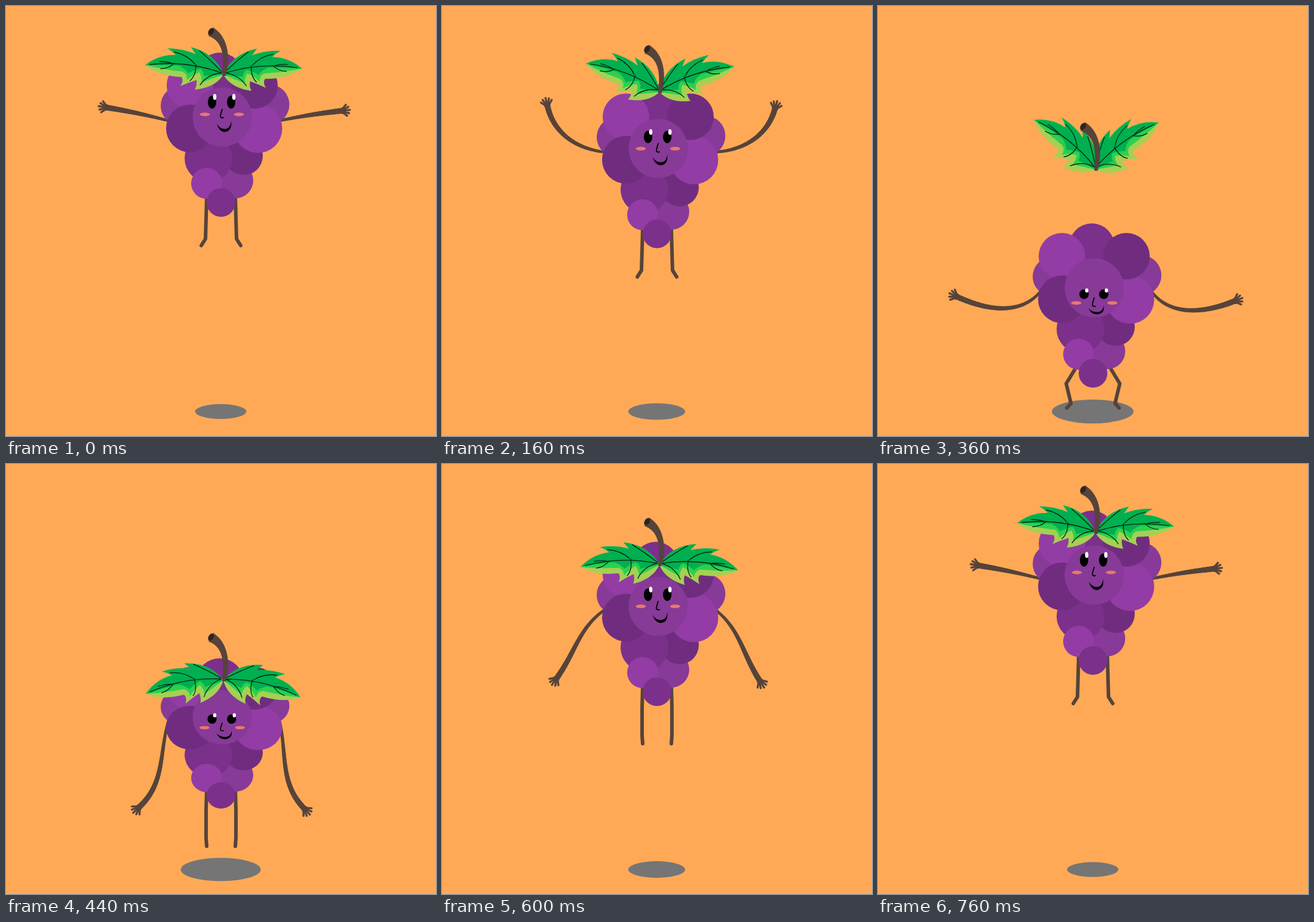
These frames come from a looping animation (720x720 px, 800 ms). An HTML page with a canvas:

```html
<!DOCTYPE html>
<html lang="en">
<head>
<meta charset="utf-8">
<title>Jumping grapes</title>
<style>
  html, body { margin: 0; width: 100%; height: 100%; overflow: hidden; background: #ffa956; }
  canvas { display: block; width: 720px; height: 720px; }
</style>
</head>
<body>
<canvas id="stage" width="720" height="720"></canvas>
<script>
const ctx = document.getElementById('stage').getContext('2d');
const LOOP = 800, STEP = 40, LAND = 400, BOUNCE = 440, TOP = 760;
const BASE = 352, GROUND = 673;
const BROWN = '#56433a', PLUM = '#7b308b', DARK = '#702d80', LIGHT = '#933ca5', MID = '#873a97';

// x, y, radius, colour, from back to front
const GRAPES = [
  [292, 167, 33, MID], [441, 165, 33.5, MID], [358, 116, 38, PLUM],
  [308, 133, 39, LIGHT], [384, 292, 30, MID], [398, 251, 32, DARK],
  [339, 255, 40, PLUM], [308, 205, 40, DARK], [422, 205.5, 40.5, LIGHT],
  [416, 133, 39, DARK], [362, 186, 49.5, MID],
  [336, 297, 26, LIGHT], [360, 329, 24, PLUM]
];

// time, wrist seen from the shoulder, angles in degrees at shoulder and wrist
const ARM = [
  [0, 102, -19, -13, -8],
  [160, 97, -73, -5, -75],
  [240, 82, -103, -2, -90],
  [360, 138, 13, 52, -23],
  [440, 44, 145, 76, 45],
  [600, 76, 115, 37, 56],
  [760, 102, -19, -13, -8]
];

const LEAF_TOP = 'M0 0Q-14-36-54-46Q-50-40-46-34Q-68-44-94-44Q-86-40-80-33Q-108-34-131-16';
const LEAF = [
  ['#a5d053', 'Q-110 2-70 4Q-66 10-72 19Q-58 13-45 9Q-44 18-48 25Q-14 22 0 0'],
  ['#2bd04f', 'Q-104-9-68-5Q-60 0-61 9Q-52 1-40-4Q-35 5-37 13Q-20 7 0 0'],
  ['#00af4f', 'Q-98-17-74-15Q-62-9-59-2Q-49-8-38-10Q-32-4-33 2Q-16 1 0 0']
].map(([color, edge]) => [color, new Path2D(LEAF_TOP + edge + 'Z')]);
const VEINS = new Path2D('M-123-17Q-62-24-3-3M-40-40Q-22-25-3-5M-82-38Q-60-33-48-18' +
  'M-107-22Q-94-22-86-19M-105-10Q-92-10-82-19M-56 10Q-46 2-46-17M-39 17Q-26-1-3-3');
const STEM = new Path2D('M-17-79C4-66 14-36 4 2L-2 2C3-38-4-57-25-65Z');
const NOSE = new Path2D('M362 173Q359 182 359 185Q360 188 364 187');
const MOUTH = new Path2D('M-12-4Q-8 10 2 10Q14 8 12-9Q11 4 2 5Q-7 5-12-4Z');

const rad = degrees => degrees * Math.PI / 180;
const mix = (a, b, p) => a + (b - a) * p;
const clamp = p => Math.min(1, Math.max(0, p));
const smooth = p => p * p * (3 - 2 * p);
const fall = t => (t / LAND) ** 2.09;
const rise = (t, from, power) => clamp((TOP - t) / (TOP - from)) ** power;

function at(keys, t) {
  const next = keys.findIndex(key => key[0] > t);
  if (next < 0) return keys[keys.length - 1].slice(1);
  const a = keys[next - 1], b = keys[next], p = (t - a[0]) / (b[0] - a[0]);
  return a.map((v, i) => mix(v, b[i], p)).slice(1);
}

function placed(x, y, draw, angle = 0, sx = 1, sy = 1) {
  ctx.save();
  ctx.translate(x, y);
  ctx.rotate(rad(angle));
  ctx.scale(sx, sy);
  draw();
  ctx.restore();
}

function oval(x, y, rx, ry, color, angle = 0) {
  ctx.fillStyle = color;
  ctx.beginPath();
  ctx.ellipse(x, y, rx, ry, angle, 0, 2 * Math.PI);
  ctx.fill();
}

function line(points, width) {
  ctx.strokeStyle = BROWN;
  ctx.lineWidth = width;
  ctx.beginPath();
  points.forEach(([x, y]) => ctx.lineTo(x, y));
  ctx.stroke();
}

function drawArm([x, y, start, end]) {
  const handle = .38 * Math.hypot(x, y), a = rad(start), b = rad(end), parts = 32;
  const bezier = (u, c1, c2, to) => 3 * (1 - u) ** 2 * u * c1 + 3 * (1 - u) * u * u * c2 + u ** 3 * to;
  const point = u => [
    bezier(u, handle * Math.cos(a), x - handle * Math.cos(b), x),
    bezier(u, handle * Math.sin(a), y - handle * Math.sin(b), y)
  ];
  for (let i = 0; i < parts; i++) line([point(i / parts), point((i + 1) / parts)], 4.5 + 5 * i / parts);

  const reach = (turn, d) => [x + d * Math.cos(b + turn), y + d * Math.sin(b + turn)];
  oval(...reach(0, 3), 5.5, 5.5, BROWN);
  for (let i = -2; i <= 2; i++) line([[x, y], reach(i * .38, 15.5 - Math.abs(i))], 3.4);
}

// Feet stay on the ground while the body sinks; on the way up they hang down.
function drawLegs(drop, hang, planted) {
  const lift = planted ? Math.max(0, 401 + drop - GROUND) : 0, spread = Math.sqrt(lift);
  const leg = [
    [336 - 1.3 * spread, 320],
    [335 - 5.3 * spread, 356 - .7 * lift],
    [mix(334, 335, hang) - 2.9 * spread, mix(390, 402, hang) - .75 * lift],
    [mix(327, 336, hang) - 2.9 * spread, mix(401, 416, hang) - lift]
  ];
  line(leg, 6);
  line(leg.map(([x, y]) => [720 - x, y]), 6);
}

function drawFace(slide) {
  const eyeY = 161 + 1.2 * slide, ry = 11 - .1 * slide;
  for (const x of [345, 377 + slide / 30]) {
    oval(x, eyeY, 7 + slide / 36, ry, '#000');
    oval(x + 4.5, eyeY - .8 * ry, 2.8, 5 - .05 * slide, '#fff');
  }
  for (const x of [333 - slide / 30, 390 + slide / 12]) oval(x, 181.5 + slide, 8.5, 3, '#e8786f');
  ctx.strokeStyle = ctx.fillStyle = '#000';
  ctx.lineWidth = 1.8;
  placed(0, slide, () => ctx.stroke(NOSE));
  placed(365, 201 + .73 * slide, () => ctx.fill(MOUTH), 0, 1 + slide / 400, 1 - slide / 120);
}

function drawLeaf() {
  for (const [color, shape] of LEAF) {
    ctx.fillStyle = color;
    ctx.fill(shape);
  }
  ctx.strokeStyle = '#06210f';
  ctx.lineWidth = 1.3;
  ctx.stroke(VEINS);
}

function drawCrown(turn) {
  placed(0, 0, drawLeaf, turn);
  placed(0, 0, drawLeaf, 2.5 - turn, -1);
  ctx.fillStyle = BROWN;
  ctx.fill(STEM);
  oval(-20, -72, 5, 7.2, BROWN, .6);
  oval(-20.5, -72, 4, 6, '#2e2420', .6);
}

function draw(t) {
  const falling = t <= LAND;
  const drop = falling ? 356.5 * fall(t) : 224 * rise(t, BOUNCE, 2.1);
  const crownDrop = falling ? 198 * fall(t) : 247 * rise(t, BOUNCE, 2.2);
  const turn = falling ? 35.6 * t / LAND : -17 * rise(t, BOUNCE, 1);
  const shadow = 43 + 31.6 * (falling ? fall(t) : rise(t, LAND, 2.35));
  const slide = 31 * (falling ? smooth(clamp((t - 80) / 320)) : rise(t, LAND, 2.35));
  const squash = falling ? 1 : 1 - .085 * clamp((540 - t) / 100);
  const hang = falling ? 0 : clamp((TOP - t) / 160);
  const shoulderY = drop + BASE - 160 * squash;
  const arm = () => drawArm(at(ARM, t));

  ctx.fillStyle = '#ffa956';
  ctx.fillRect(0, 0, 720, 720);
  ctx.lineCap = ctx.lineJoin = 'round';
  oval(359.5, 679, shadow, shadow * .291, '#757575');
  placed(0, drop, () => drawLegs(drop, hang, falling));
  placed(272, shoulderY, arm, 1.5, -1);
  placed(458, shoulderY, arm, 1.5);
  placed(0, drop + BASE * (1 - squash), () => {
    GRAPES.forEach(([x, y, r, color]) => oval(x, y, r, r, color));
    drawFace(slide);
  }, 0, 1, squash);
  placed(364, 115 + crownDrop, () => drawCrown(turn));
}

function tick() {
  draw(Math.floor(performance.now() % LOOP / STEP) * STEP);
  requestAnimationFrame(tick);
}
tick();
</script>
</body>
</html>
```
